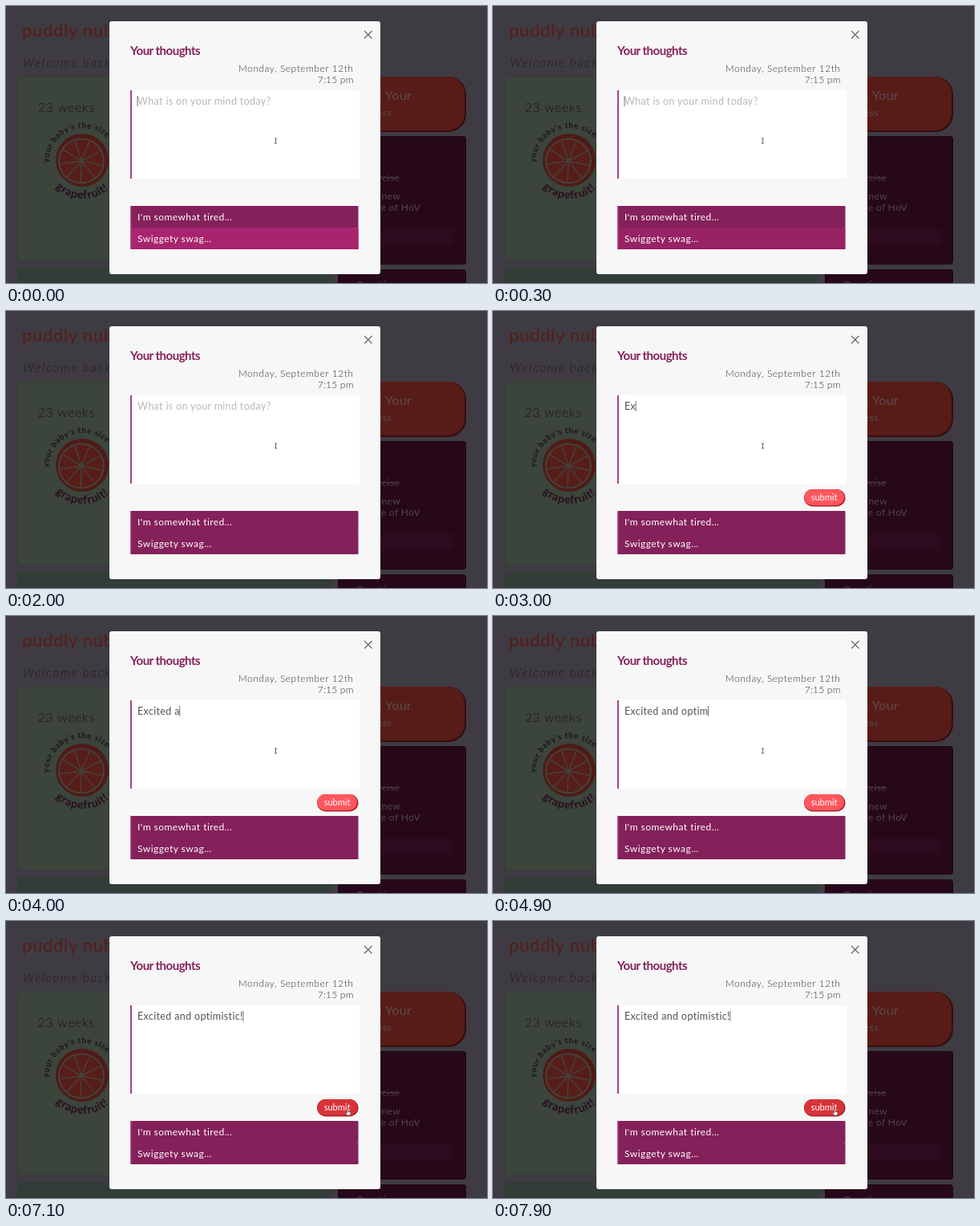
An HTML page for the animation above (8 s loop, 600 by 345 pixels).

```html
<!DOCTYPE html>
<html lang="en">
<head>
<meta charset="utf-8">
<title>Journal dialog</title>
<style>
  html, body { margin: 0; width: 100%; height: 100%; overflow: hidden; background: #3f3b42; }
  svg { display: block; width: 600px; height: 345px; }
  text { font-family: Lato, "Open Sans", sans-serif; white-space: pre; }
  .brand { font-size: 22px; letter-spacing: .7px; fill: #561d19; }
  .welcome { font-size: 15px; font-style: italic; font-weight: 300; letter-spacing: 1.8px; fill: #231b23; }
  .plum { fill: #21111c; }
  .side { font-size: 12px; letter-spacing: .4px; fill: #51464e; text-anchor: end; }
  .title { font-size: 15px; font-weight: 700; letter-spacing: -.5px; fill: #84205a; }
  .date { font-size: 12px; font-weight: 300; letter-spacing: .55px; fill: #333136; text-anchor: end; }
  .field { font-size: 12.5px; letter-spacing: .35px; }
  .row { font-size: 12px; letter-spacing: .45px; fill: #fff; }
</style>
</head>
<body>
<svg viewBox="0 0 600 345">
  <defs>
    <path id="over" d="M53 195A43 43 0 0 1 139 195"/>
    <path id="under" d="M47 191A49 49 0 0 0 145 191"/>
  </defs>

  <!-- dimmed page -->
  <rect width="600" height="345" fill="#3f3b42"/>
  <text class="brand" x="20" y="38">puddly nub</text>
  <text class="welcome" x="21" y="76">Welcome back</text>
  <g stroke="#363b38">
    <rect x="15" y="88" width="390" height="229" rx="3" fill="#3b453b"/>
    <rect x="15" y="325.5" width="390" height="40" rx="3" fill="#313d36"/>
  </g>
  <text class="plum" x="39.5" y="132" font-size="16" font-weight="300" letter-spacing=".7">23 weeks</text>
  <text class="plum" font-size="10" font-weight="700" letter-spacing=".7"><textPath href="#over">your baby's the size</textPath></text>
  <text fill="#280d1e" font-size="14" font-weight="700" letter-spacing=".7"><textPath href="#under" startOffset="39">grapefruit!</textPath></text>
  <g id="fruit" transform="translate(95 192)">
    <circle r="33" fill="#4f1a17"/>
    <ellipse cx="-1" cy="1" rx="29" ry="28.5" fill="#45413b"/>
    <ellipse cx="-1" cy="1" rx="27" ry="26.5" fill="#571d19"/>
  </g>

  <rect x="414" y="88" width="160" height="69" rx="22" fill="#360c10"/>
  <rect x="414" y="88" width="158" height="67" rx="21" fill="#571c18"/>
  <text class="side" x="506" y="117" style="font-size:16px;letter-spacing:.3px;fill:#5c4a4b">Track Your</text>
  <text class="side" x="481" y="137" style="fill:#5c4a4b">Progress</text>
  <g fill="#270819" stroke="#1a0511">
    <rect x="414.5" y="162.5" width="159" height="159" rx="3"/>
    <rect x="414.5" y="328.5" width="159" height="40" rx="3"/>
  </g>
  <rect x="430" y="277" width="128" height="20" fill="#2b0b1d"/>
  <text class="side" x="491" y="218" text-decoration="line-through" opacity=".8">exercise</text>
  <text class="side" x="492" y="241">buy new</text>
  <text class="side" x="517" y="255">episode of HoV</text>
  <text class="side" x="494" y="351">Questions</text>

  <!-- dialog -->
  <rect x="129" y="19" width="338" height="315" rx="3" fill="#f7f7f7"/>
  <path d="M447 31l9.5 9.5M456.5 31l-9.5 9.5" stroke="#66646a" stroke-width="1.2"/>
  <text class="title" x="155" y="60.5">Your thoughts</text>
  <text class="date" x="433.5" y="82">Monday, September 12th</text>
  <text class="date" x="433.5" y="95.5" style="letter-spacing:.2px">7:15 pm</text>
  <rect x="155" y="105" width="286" height="110" fill="#fff"/>
  <rect x="155" y="105" width="2" height="110" fill="#a9418a"/>
  <text id="hint" class="field" x="164" y="123" fill="#b9b7bc">What is on your mind today?</text>
  <text id="typed" class="field" x="164" y="123" fill="#555158"></text>
  <rect id="caret" y="112" width="1" height="13" fill="#77737a"/>

  <g id="submit">
    <rect x="388" y="222" width="51.5" height="21.5" rx="10.7" fill="#b3202b"/>
    <rect id="pill" x="388" y="222" width="50" height="20" rx="10"/>
    <text x="413" y="236" font-size="11" fill="#fff" text-anchor="middle">submit</text>
  </g>

  <rect x="155" y="249" width="284.5" height="54" rx="1" fill="#84205a"/>
  <rect id="glow" x="155" y="276" width="284.5" height="27" fill="#a8246f"/>
  <rect x="155" y="249" width="1.5" height="54" fill="#b04a90"/>
  <rect x="437" y="276" width="2.5" height="1" fill="#a9518c"/>
  <text class="row" x="164" y="267">I'm somewhat tired…</text>
  <text class="row" x="164" y="294">Swiggety swag…</text>

  <g id="mouse">
    <path id="beam" d="M-1.5 -3H1.5M0 -3V3M-1.5 3H1.5" stroke="#666" fill="none"/>
    <path id="arrow" d="M0 -3V5L2 3.5L3 6L4.2 5.5L3.2 3H5.5Z" fill="#222" stroke="#fff" stroke-width=".5"/>
    <path id="hand" d="M-.8 -3Q0 -4 .8 -3V-.5L3.2 .2Q3.8 .5 3.5 2L2.800 4H-.8L-3 1Q-2.5 0 -.8 1Z" fill="#fff" stroke="#333" stroke-width=".6"/>
  </g>
</svg>
<script>
  const $ = id => document.getElementById(id);
  const LOOP = 8000, BLINK = 530, TEXT = 'Excited and optimistic!';
  const clamp = v => Math.min(1, Math.max(0, v));
  const ramp = (t, from, span) => clamp((t - from) / span);
  const show = (id, on) => $(id).style.display = on ? '' : 'none';

  // membranes of the cut fruit
  const count = 9;
  for (let i = 0; i < count; i++) {
    const line = document.createElementNS('http://www.w3.org/2000/svg', 'path');
    const a = (i + .3) / count * Math.PI * 2;
    line.setAttribute('d', `M-1 1L${-1 + 27 * Math.cos(a)} ${1 + 26.5 * Math.sin(a)}`);
    line.setAttribute('stroke', '#45413b');
    line.setAttribute('stroke-width', '1.5');
    $('fruit').append(line);
  }

  function letters(t) {
    if (t < 2600) return 0;
    if (t < 2800) return 1;
    if (t < 3200) return 2;
    return Math.min(TEXT.length, 3 + Math.floor((t - 3200) / 121));
  }

  // blinks while idle, stays solid while typing
  function caretOn(t) {
    if (t < 2600) return Math.floor(t / BLINK) % 2 === 0;
    return t < 6200 || Math.floor((t - 6200) / BLINK) % 2 === 1;
  }

  function draw(t) {
    const n = letters(t);
    $('typed').textContent = TEXT.slice(0, n);
    show('hint', n === 0);
    const width = n ? $('typed').getComputedTextLength() : 0;
    $('caret').setAttribute('x', 163.5 + width);
    show('caret', caretOn(t));

    $('glow').style.opacity = 1 - ramp(t, 100, 400);
    $('submit').style.opacity = ramp(t, 2550, 250);

    const u = ramp(t, 6200, 800), s = u * u * (3 - 2 * u);
    const x = 336.5 + 90 * s, y = 168 + 70 * s ** 1.5;
    $('mouse').setAttribute('transform', `translate(${x} ${y})`);
    show('beam', y < 214);
    show('arrow', y >= 214 && y < 223);
    show('hand', y >= 223);

    const h = ramp(t, 6800, 200);
    const mix = (a, b) => Math.round(a + (b - a) * h);
    $('pill').setAttribute('fill', `rgb(${mix(255, 215)},${mix(86, 52)},${mix(94, 58)})`);
  }

  const start = performance.now();
  (function tick() {
    draw((performance.now() - start) % LOOP);
    requestAnimationFrame(tick);
  })();
</script>
</body>
</html>
```
